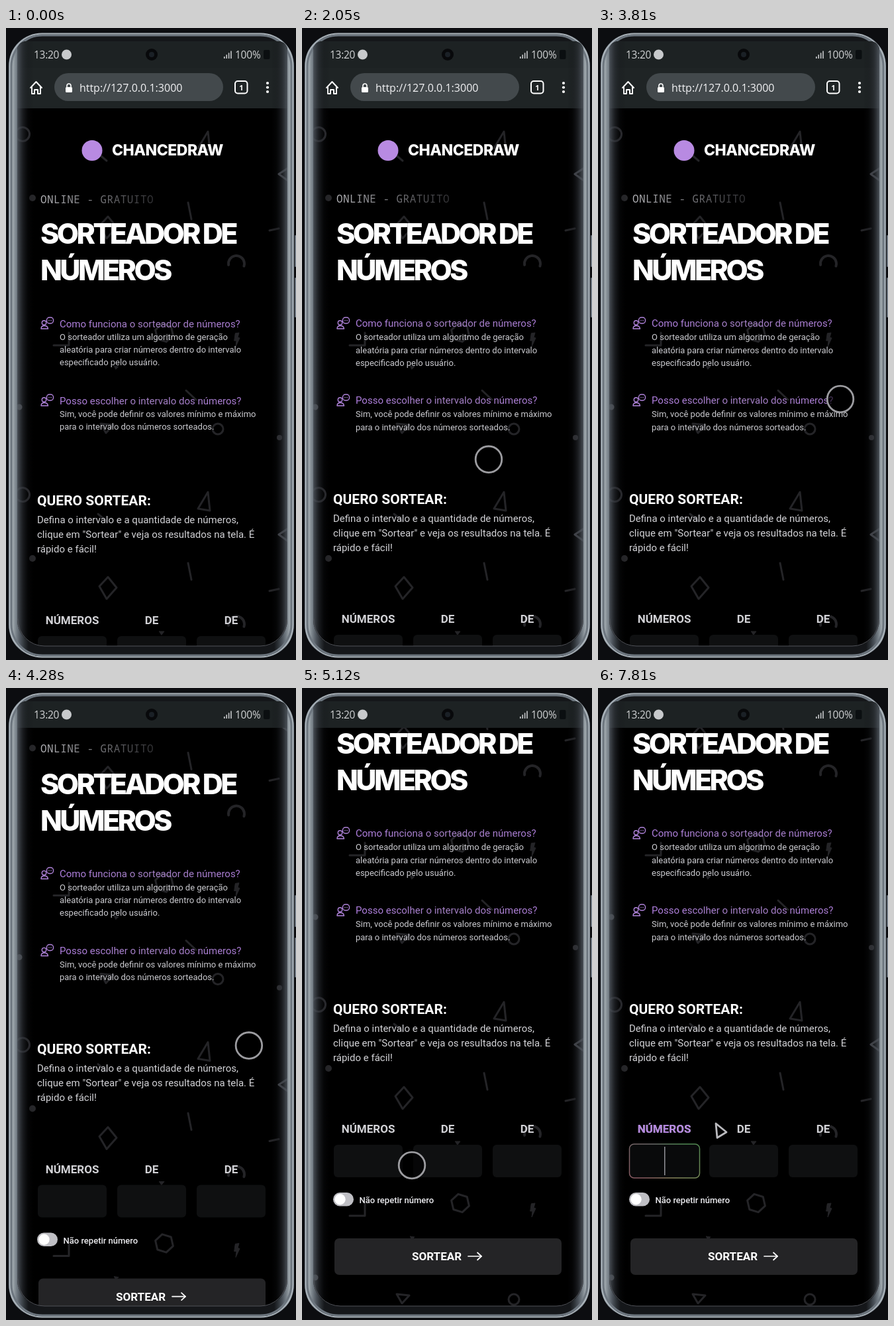
Recreate the animation shown at these times as an HTML page with a canvas. Size 438 by 952 pixels, loop 8000 ms.

```html
<!DOCTYPE html>
<html lang="pt">
<head>
<meta charset="utf-8">
<title>Sorteador de números</title>
<style>
html, body { margin: 0; width: 100%; height: 100%; overflow: hidden; background: #0c0d10; }
canvas { display: block; width: 438px; height: 952px; }
</style>
</head>
<body>
<canvas id="stage" width="438" height="952"></canvas>
<script>
const c = document.getElementById('stage').getContext('2d');
const LOOP = 8000, MAX_SCROLL = 226, TILE = 543;
const GREY = '#d2d2d6', WHITE = '#ffffff', FAINT = '#242427', PURPLE = '#b184dc';
const ROBOTO = 'Roboto, sans-serif', TITLE = 'Inter, sans-serif', UI = '"Open Sans", sans-serif';

const clamp = (v, a = 0, b = 1) => Math.min(b, Math.max(a, v));
const mix = (a, b, p) => a + (b - a) * p;
const progress = (t, a, b) => clamp((t - a) / (b - a));

function text(s, x, y, font, color, spacing = 0, align = 'left') {
  c.font = font;
  c.fillStyle = color;
  c.letterSpacing = spacing + 'px';
  c.textAlign = align;
  c.fillText(s, x, y);
}

function box(x, y, w, h, r, fill, stroke, width = 1) {
  c.beginPath();
  c.roundRect(x, y, w, h, r);
  if (fill) { c.fillStyle = fill; c.fill(); }
  if (stroke) { c.strokeStyle = stroke; c.lineWidth = width; c.stroke(); }
}

function disc(x, y, r, fill, stroke, width = 1) {
  c.beginPath();
  c.arc(x, y, r, 0, Math.PI * 2);
  if (fill) { c.fillStyle = fill; c.fill(); }
  if (stroke) { c.strokeStyle = stroke; c.lineWidth = width; c.stroke(); }
}

function line(points, color, width, closed = false, fill) {
  c.beginPath();
  points.forEach(([x, y]) => c.lineTo(x, y));
  if (closed) c.closePath();
  if (fill) { c.fillStyle = fill; c.fill(); }
  c.strokeStyle = color;
  c.lineWidth = width;
  c.stroke();
}

function ramp(x0, x1, ...colors) {
  const g = c.createLinearGradient(x0, 0, x1, 0);
  colors.forEach((col, i) => g.addColorStop(i / (colors.length - 1), col));
  return g;
}

// Pointer path: time, x, y
const ringPath = [
  [840, 307, 620], [1020, 294, 639], [1300, 294, 639], [1490, 282, 650],
  [2050, 282, 650], [2300, 272, 600], [2590, 258, 556], [3160, 258, 556],
  [3260, 278, 611], [3400, 278, 611], [3600, 368, 588], [3800, 366, 559],
  [3830, 366, 559], [3910, 366, 539], [4740, 368, 538], [4930, 262, 634],
  [5110, 166, 719], [5200, 166, 719], [5400, 142, 715], [5620, 140, 714]
];
const arrowPath = [
  [5950, 140, 712], [6250, 212, 700], [6480, 200, 675], [6700, 178, 656], [8000, 178, 656]
];

function along(path, t) {
  let i = 0;
  while (i < path.length - 2 && t >= path[i + 1][0]) i++;
  const [t0, x0, y0] = path[i], [t1, x1, y1] = path[i + 1];
  const p = progress(t, t0, t1);
  return [mix(x0, x1, p), mix(y0, y1, p)];
}

function scrollAt(t) {
  return MAX_SCROLL * (1 - Math.pow(1 - progress(t, 4040, 4560), 2.116));
}

function tile(dy) {
  c.save();
  c.translate(0, dy);
  disc(25, 160, 10.5, null, '#2c2c30', 3);
  line([[305, 156], [308, 184], [290, 181]], FAINT, 3, true);
  line([[426, 211], [412, 220], [426, 230]], '#505258', 3, true);
  line([[139, 189], [152, 200]], FAINT, 3);
  disc(40, 256, 5, '#27272a');
  line([[275, 263], [280, 288]], FAINT, 3);
  line([[154, 284], [167, 300], [152, 317], [141, 298]], FAINT, 3, true);
  line([[398, 305], [412, 302]], FAINT, 3);
  c.beginPath();
  c.arc(348, 355, 12, Math.PI * 0.95, Math.PI * 2.1);
  c.strokeStyle = FAINT;
  c.lineWidth = 4;
  c.stroke();
  line([[231, 366], [239, 366], [235, 371]], FAINT, 1, true, FAINT);
  const hex = Array.from({ length: 6 }, (_, i) =>
    [239 + 14 * Math.cos(i * Math.PI / 3 + 0.3), 459 + 14 * Math.sin(i * Math.PI / 3 + 0.3)]);
  line(hex, FAINT, 3, true);
  line([[346, 460], [352, 459], [350, 466], [353, 467], [347, 480], [348, 471], [345, 471]], FAINT, 1, true, FAINT);
  line([[72, 478], [95, 478], [95, 459]], FAINT, 3);
  line([[163, 509], [170, 510], [166, 514]], FAINT, 1, true, FAINT);
  line([[272, 546], [287, 560]], FAINT, 3);
  disc(20, 571, 4.5, '#64666c');
  disc(320, 604, 8, null, FAINT, 3);
  line([[143, 596], [162, 598], [151, 610]], FAINT, 3, true);
  disc(413, 617, 4, '#343438');
  c.restore();
}

function addressBar() {
  c.fillStyle = '#1f2425';
  c.fillRect(0, 20, 438, 101);
  line([[37, 90], [45.5, 81], [54, 90]], WHITE, 2);
  line([[39, 89], [39, 99], [43, 99], [43, 93], [48, 93], [48, 99], [52, 99], [52, 89]], WHITE, 2);
  box(73, 68, 255, 42, 21, '#43494c');
  box(90, 89, 10, 8, 1.5, WHITE);
  c.beginPath();
  c.arc(95, 87, 3, Math.PI, 0);
  c.lineTo(98, 90);
  c.moveTo(92, 87);
  c.lineTo(92, 90);
  c.strokeStyle = WHITE;
  c.lineWidth = 1.6;
  c.stroke();
  text('http://127.0.0.1:3000', 111, 96, '16px ' + UI, '#f2f2f4');
  box(346, 80, 18.5, 18.5, 4, null, WHITE, 2);
  text('1', 355.3, 93.5, 'bold 11px ' + UI, WHITE, 0, 'center');
  [83, 89.5, 96].forEach(y => disc(395, y, 2.1, WHITE));
}

function personIcon(y) {
  disc(57.5, y - 1, 3.2, null, PURPLE, 1.4);
  c.beginPath();
  c.moveTo(53, y + 8);
  c.quadraticCurveTo(53, y + 3.5, 58, y + 3.5);
  c.quadraticCurveTo(63, y + 3.5, 63.5, y + 8);
  c.closePath();
  c.stroke();
  c.beginPath();
  c.roundRect(61.5, y - 9, 10, 9, 4);
  c.stroke();
  disc(65, y - 4.5, 0.8, PURPLE);
  disc(68, y - 4.5, 0.8, PURPLE);
}

const faq = [
  { y: 450, q: 'Como funciona o sorteador de números?', a: [
    'O sorteador utiliza um algoritmo de geração',
    'aleatória para criar números dentro do intervalo',
    'especificado pelo usuário.'] },
  { y: 566, q: 'Posso escolher o intervalo dos números?', a: [
    'Sim, você pode definir os valores mínimo e máximo',
    'para o intervalo dos números sorteados.'] }
];

function faqItem({ y, q, a }, rise, color) {
  text(q, 81, y + rise, '15px ' + ROBOTO, color || ramp(81, 354, '#b07ee0', '#a27fc2', '#ab7cd6'));
  a.forEach((s, i) => text(s, 81, y + 20.3 + i * 19.2 - rise / 2, '13px ' + ROBOTO, color || '#cbcbd0'));
}

function selection(t) {
  if (t < 2050 || t >= 3160) return;
  const [rx, ry] = along(ringPath, t), x = rx + 3;
  const rows = [];
  if (ry < 571) rows.push([x, 551, 357 - x, 20], [81, 571, 301, 20], [81, 591, 195, 20]);
  else if (ry < 591) rows.push([x, 571, 382 - x, 20], [81, 591, 195, 20]);
  else if (ry < 614) rows.push([Math.min(x, 276), 591, Math.abs(276 - x), 20]);
  if (!rows.length) return;
  c.save();
  c.beginPath();
  rows.forEach(r => c.rect(...r));
  c.fillStyle = '#0a389e';
  c.fill();
  c.clip();
  faqItem(faq[1], 0, WHITE);
  c.restore();
}

function form(t) {
  const focus = progress(t, 5480, 5660);
  text('QUERO SORTEAR:', 47, 716.5, 'bold 21px ' + ROBOTO, WHITE);
  ['Defina o intervalo e a quantidade de números,',
   'clique em "Sortear" e veja os resultados na tela. É',
   'rápido e fácil!'].forEach((s, i) => text(s, 47, 743.5 + i * 22.2, '15px ' + ROBOTO, GREY));

  ['NÚMEROS', 'DE', 'DE'].forEach((s, i) => {
    const x = 100 + i * 120;
    text(s, x, 896, 'bold 17px ' + ROBOTO, GREY, 0, 'center');
    if (i === 0 && focus) {
      c.globalAlpha = focus;
      text(s, x, 896, 'bold 17px ' + ROBOTO, PURPLE, 0, 'center');
      c.globalAlpha = 1;
    }
    box(x - 52, 914, 104, 49, 6, '#0f1011');
  });
  if (focus) {
    const g = c.createConicGradient(t / 1000 * Math.PI, 100, 938);
    ['#4f8a52', '#86865a', '#8a5a62', '#6a6a6a', '#4f8a52'].forEach((col, i) => g.addColorStop(i / 4, col));
    c.globalAlpha = focus;
    box(47.5, 913, 106, 51, 7, '#090a0b', g, 1.5);
    c.globalAlpha = 1;
    if (t > 5560 && Math.floor((t - 5560) / 530) % 2 === 0) {
      c.fillStyle = '#929298';
      c.fillRect(100, 917, 1.5, 43);
    }
  }

  box(47, 986, 31, 20.5, 10.2, '#bfbfc4');
  disc(57.5, 996.2, 8.2, WHITE);
  text('Não repetir número', 86.5, 1002.3, '500 13px ' + ROBOTO, '#ececf0');
  box(49, 1055, 343, 55, 7, '#242426');
  text('SORTEAR', 166, 1088, 'bold 17px ' + ROBOTO, WHITE);
  line([[251, 1082], [271, 1082]], WHITE, 1.7);
  line([[265, 1076.5], [271, 1082], [265, 1087.5]], WHITE, 1.7);
}

function page(t) {
  const settle = 1 - progress(t, 90, 650);
  c.save();
  c.beginPath();
  c.rect(0, 60, 438, 900);
  c.clip();
  c.translate(0, -scrollAt(t));
  for (let i = 0; i < 3; i++) tile(i * TILE);

  disc(130, 184.5, 15.5, '#b88ae2');
  text('CHANCEDRAW', 160, 191.5, '800 23px ' + TITLE, WHITE, -0.5);
  text('ONLINE - GRATUITO', 52, 262.5 + settle, '500 16px "Noto Sans Mono", monospace',
    ramp(52, 224, '#b2b2b6', '#747478', '#303033'), 0.46);
  text('SORTEADOR DE', 52, 325, '800 43px ' + TITLE, WHITE, -3.6);
  text('NÚMEROS', 52, 380, '800 43px ' + TITLE, WHITE, -3.6);
  faq.forEach(item => {
    personIcon(item.y - 5);
    faqItem(item, settle);
  });
  selection(t);
  c.translate(0, 2 * settle);
  form(t);
  c.translate(0, -2 * settle);
  addressBar();
  c.restore();
}

function statusBar() {
  c.fillStyle = '#1d2223';
  c.fillRect(0, 20, 438, 40);
  text('13:20', 42, 46, '15.5px ' + UI, '#d0d2d4', -0.3);
  disc(91.5, 40, 7.5, '#c8cacc');
  disc(220, 40, 9, '#08090b');
  disc(220, 40, 4, '#1a2026');
  c.fillStyle = '#c8cacc';
  for (let i = 0; i < 4; i++) c.fillRect(329 + i * 3.4, 43 - i * 2.8, 1.6, 3 + i * 2.8);
  text('100%', 384.5, 46, '15.5px ' + UI, '#d0d2d4', -0.2, 'right');
  box(389, 33, 9.5, 14, 2, '#0b0f11');
}

function phoneBody() {
  c.fillStyle = '#0c0d10';
  c.fillRect(0, 0, 438, 952);
  box(436, 312, 2, 48, 1, '#6a737c');
  box(436, 376, 2, 60, 1, '#6a737c');
  const rim = ['#59636f', '#a2abb0', '#747d85', '#4b525a', '#2c3136', '#15171a'];
  box(4, 7, 431, 942, 50, '#15171a');
  c.save();
  c.clip();
  c.fillStyle = ramp(4, 34, ...rim);
  c.fillRect(4, 7, 30, 942);
  c.fillStyle = ramp(435, 405, ...rim);
  c.fillRect(405, 7, 30, 942);
  c.restore();
  box(8, 11, 423, 934, 47, null, '#6d767f', 3);
  box(5.5, 8.5, 428, 939, 49, null, '#aab3ba', 2);
}

function edgeGlow() {
  const fade = ['rgba(82,89,97,.9)', 'rgba(48,52,58,.55)', 'rgba(24,26,30,.2)', 'rgba(12,13,16,0)'];
  c.fillStyle = ramp(17, 42, ...fade);
  c.fillRect(17, 20, 25, 912);
  c.fillStyle = ramp(425, 400, ...fade);
  c.fillRect(400, 20, 25, 912);
}

function pointers(t) {
  if ((t >= 840 && t < 4740) || (t >= 4930 && t < 5620)) {
    const [x, y] = along(ringPath, t);
    disc(x, y, 19.8, 'rgba(0,0,0,.6)', '#9c9ca0', 2.8);
  }
  if (t >= 5950) {
    const [x, y] = along(arrowPath, t);
    line([[x, y], [x + 16, y + 13], [x + 2, y + 21.5]], '#bababe', 2.8, true, '#030304');
  }
}

function draw(t) {
  c.lineJoin = c.lineCap = 'round';
  phoneBody();
  c.save();
  c.beginPath();
  c.roundRect(17, 20, 408, 911, [14, 14, 40, 40]);
  c.clip();
  c.fillStyle = '#000';
  c.fillRect(0, 0, 438, 952);
  page(t);
  statusBar();
  edgeGlow();
  c.restore();
  c.beginPath();
  c.moveTo(18, 890);
  c.arcTo(18, 931, 58, 931, 40);
  c.lineTo(384, 931);
  c.arcTo(424, 931, 424, 890, 40);
  c.strokeStyle = '#505258';
  c.lineWidth = 1;
  c.stroke();
  pointers(t);
}

const start = performance.now();
function tick() {
  draw((performance.now() - start) % LOOP);
  requestAnimationFrame(tick);
}
tick();
</script>
</body>
</html>
```
